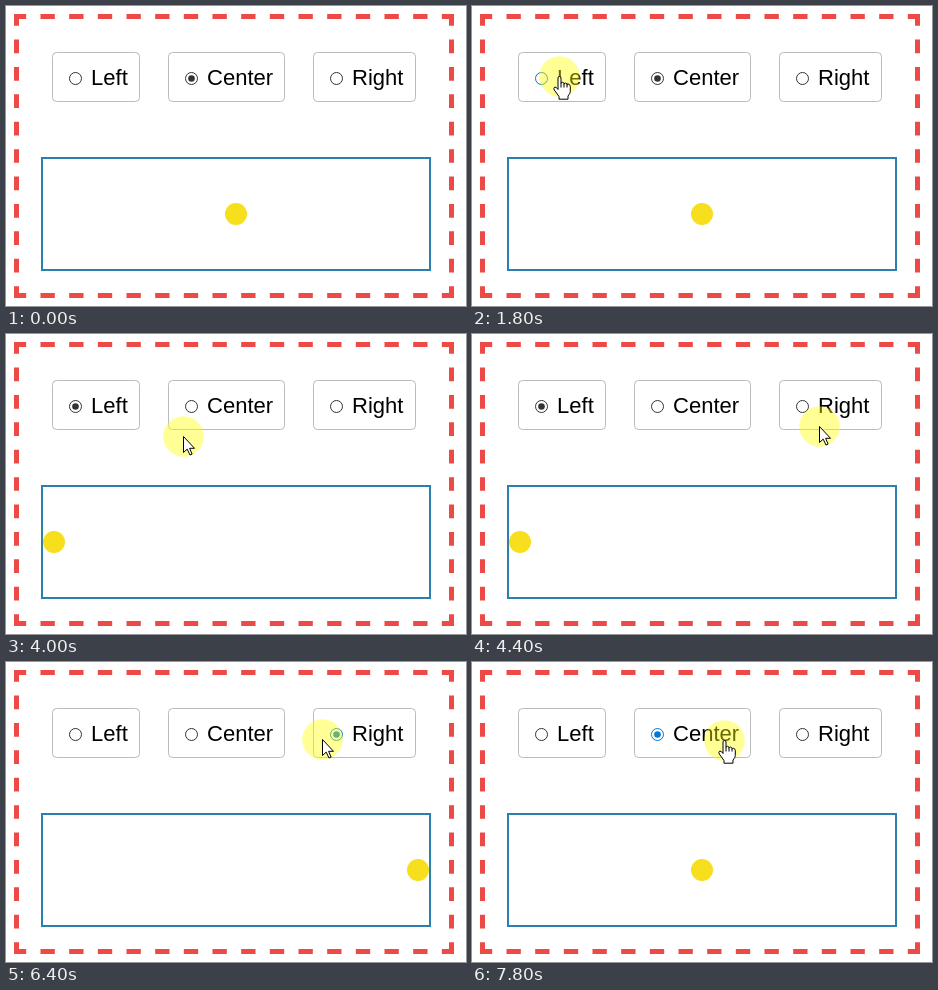
Recreate the animation shown at these times as an HTML page. Size 460 by 300 pixels, loop 8000 ms.

```html
<!DOCTYPE html>
<html lang="en">
<head>
<meta charset="utf-8">
<title>Ball alignment</title>
<style>
html, body { margin: 0; width: 100%; height: 100%; overflow: hidden; background: #fff; }
svg { display: block; width: 460px; height: 300px; }
text { font: 22px "Liberation Sans", Arial, sans-serif; }
</style>
</head>
<body>
<svg viewBox="0 0 460 300">
  <g id="frame" fill="#ed4a47" stroke="#ed4a47"></g>
  <g id="options"></g>
  <rect x="36" y="152" width="388" height="112" fill="none" stroke="#2a80ae" stroke-width="2"/>
  <circle id="ball" cy="208" r="11" fill="#f7df1e"/>
  <g id="pointer">
    <circle r="20.3" fill="#ff0" fill-opacity=".41"/>
    <g fill="#fff" stroke="#000" stroke-linejoin="round">
      <path id="arrow" d="M0 0V16L3.7 12.6L6.5 18.5L8.6 17.6L6.1 11.8H11Z"/>
      <path id="hand" d="M-1.5 13V1.5Q-1.5 0 0 0T1.5 1.5V7Q1.5 5.8 3 5.8T4.5 7.3V8Q4.5 6.6 6 6.6T7.5 8.2V9Q7.5 7.8 9 7.8T10.8 10V15Q10.8 17 8.5 19.5V22.7H-.5V20L-5.2 13.5Q-6.4 11.5 -4.8 10.6Q-3.2 10.2 -1.5 13ZM1.5 7V11M4.5 8V11M7.5 9V11"/>
    </g>
  </g>
</svg>
<script>
const LOOP = 8000, STEP = 200;
const LEFT = 0, CENTER = 1, RIGHT = 2, NONE = -1;
const $ = id => document.getElementById(id);

function add(parent, tag, attrs, text) {
  const node = document.createElementNS("http://www.w3.org/2000/svg", tag);
  set(node, attrs);
  if (text) node.textContent = text;
  return parent.appendChild(node);
}

function set(node, attrs) {
  for (const key in attrs) node.setAttribute(key, attrs[key]);
}

// Dashed frame: square corners, each side starting and ending on half a dash
function side(x1, y1, x2, y2, dash) {
  add($("frame"), "line", {
    x1, y1, x2, y2, "stroke-width": 5,
    "stroke-dasharray": dash, "stroke-dashoffset": dash / 2
  });
}
for (const y of [8, 287]) {
  side(13, y + 2.5, 443, y + 2.5, 430 / 30);
  for (const x of [8, 443]) add($("frame"), "rect", { x, y, width: 5, height: 5, stroke: "none" });
}
for (const x of [10.5, 445.5]) side(x, 13, x, 287, 274 / 20);

const radios = [["Left", 46, 88], ["Center", 162, 117], ["Right", 307, 103]].map(([label, x, width]) => {
  const group = $("options");
  add(group, "rect", {
    x: x + .5, y: 46.5, width: width - 1, height: 49, rx: 4, fill: "#fff", stroke: "#bbb"
  });
  add(group, "text", { x: x + 39.1, y: 79 }, label);
  const cx = x + 23.5, cy = 72.5;
  return {
    ring: add(group, "circle", { cx, cy, r: 6 }),
    dot: add(group, "circle", { cx, cy, r: 3.3 })
  };
});

// Each track holds [start time, ...state]; a state lasts until the next one.
const pointerTrack = [
  [0],
  [1000, 179.5, 299.5, "arrow"],
  [1200, 161.5, 131.5, "arrow"],
  [1400, 61.5, 68.5, "arrow"],
  [1600, 67.5, 63.5, "hand"],
  [1800, 87.5, 70.5, "hand"],
  [2600, 100.5, 77.5, "hand"],
  [2800, 101.5, 77.5, "hand"],
  [3000, 101.5, 78.5, "hand"],
  [3800, 102.5, 84.5, "arrow"],
  [4000, 177.5, 102.5, "arrow"],
  [4200, 312.5, 100.5, "arrow"],
  [4400, 347.5, 92.5, "arrow"],
  [4600, 377.5, 73.5, "hand"],
  [4800, 378.5, 70.5, "hand"],
  [6400, 316.5, 77.5, "arrow"],
  [6600, 255.5, 78.5, "hand"],
  [6800, 252.5, 78.5, "hand"]
];
const hoverTrack = [[0, NONE], [1600, LEFT], [4000, NONE], [4600, RIGHT], [6600, CENTER]];
const pressTrack = [[0, NONE], [2800, LEFT], [3000, NONE], [5400, RIGHT], [5600, NONE], [7600, CENTER], [7800, NONE]];
const checkTrack = [[0, CENTER], [3000, LEFT], [5600, RIGHT], [7800, CENTER]];

const at = (track, time) => track.findLast(([start]) => start <= time).slice(1);

function render(now) {
  const time = Math.floor((now % LOOP) / STEP) * STEP;
  const [hovered] = at(hoverTrack, time);
  const [pressed] = at(pressTrack, time);
  const [checked] = at(checkTrack, time);
  const [x, y, shape] = at(pointerTrack, time);

  radios.forEach(({ ring, dot }, i) => {
    const color = i === pressed ? "#005499" : i === hovered ? "#0078d7" : "#333";
    set(ring, { stroke: color, fill: i === pressed ? "#cce4f7" : "#fff" });
    set(dot, { fill: color, visibility: i === checked ? "visible" : "hidden" });
  });
  set($("ball"), { cx: [48, 230, 412][checked] });

  set($("pointer"), { display: shape ? "inline" : "none" });
  if (shape) set($("pointer"), { transform: `translate(${x} ${y})` });
  for (const id of ["arrow", "hand"]) set($(id), { display: id === shape ? "inline" : "none" });
}

function tick() {
  render(performance.now());
  requestAnimationFrame(tick);
}
tick();
</script>
</body>
</html>
```
